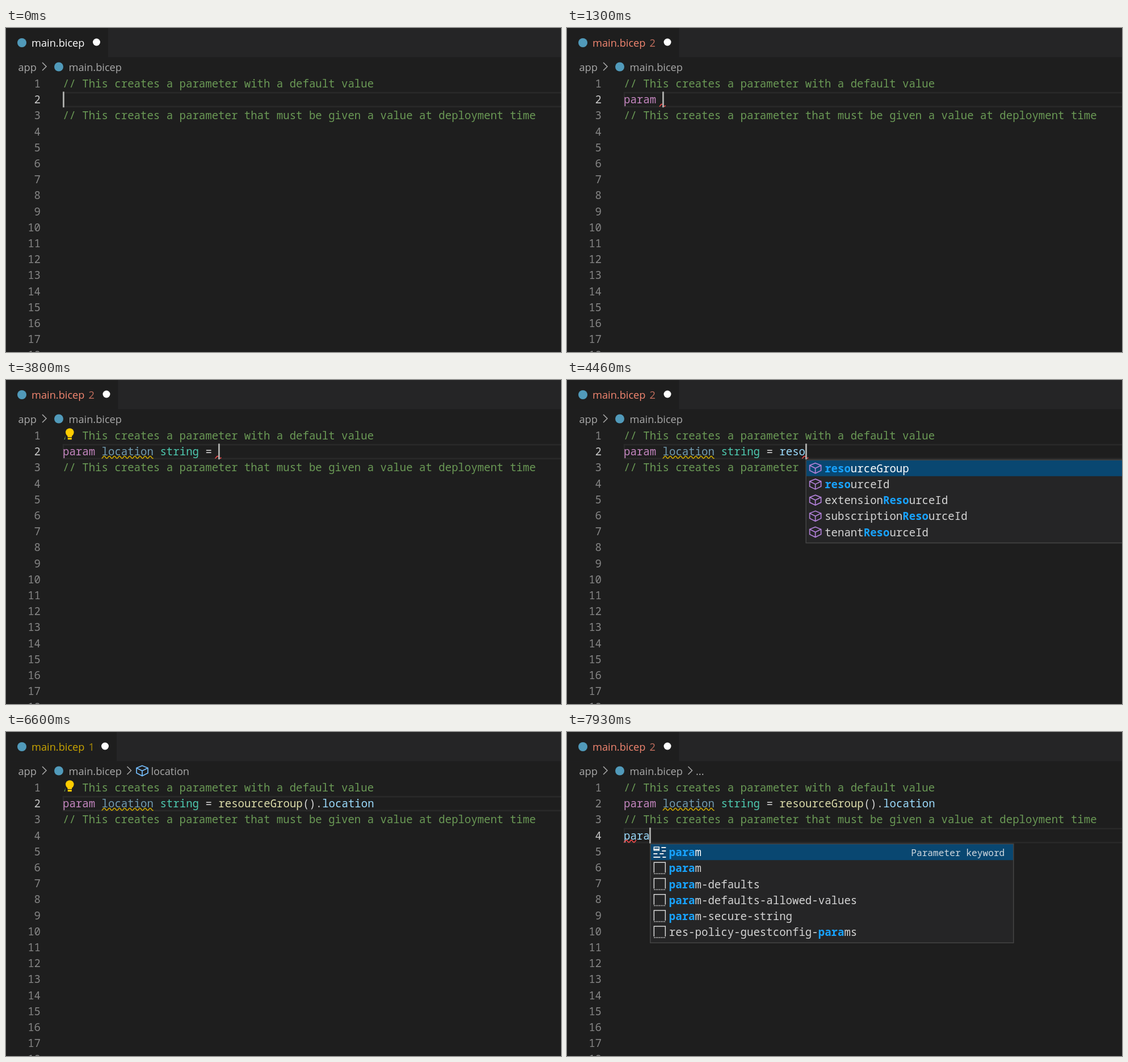
Animation of 978 by 572 pixels, one loop 8000 ms. Source, as an HTML page with a canvas:

```html
<!DOCTYPE html>
<html lang="en">
<head>
<meta charset="utf-8">
<title>Editor typing</title>
<style>
html, body { margin: 0; width: 100%; height: 100%; overflow: hidden; background: #1e1e1e; }
canvas { display: block; }
</style>
</head>
<body>
<canvas id="stage" width="978" height="572"></canvas>
<script>
const ctx = document.getElementById('stage').getContext('2d');
const LOOP = 8000, LEFT = 100, CHAR = 11.43, LINE = 28.2, TOP = 84.2;
const MONO = '19.05px "Noto Sans Mono", monospace';
const SMALL = '16.2px "Noto Sans Mono", monospace';
const UI = '18.2px "Open Sans", sans-serif';
const RED = '#f14c4c', YELLOW = '#cca700', BLUE = '#519aba';
const colX = col => LEFT + col * CHAR;
const lineTop = line => TOP + (line - 1) * LINE;

// Completion lists: [label, icon, detail]
const group = (icon, names, detail = '') => names.split(' ').map(name => [name, icon, detail]);
const MENUS = {
  words: [
    ['param', 'keyword', 'Parameter keyword'],
    ...group('snippet', 'param param-defaults param-defaults-allowed-values param-secure-string'),
    ...group('snippet', 'res-policy-guestconfig-params res-api-management res-app-plan'),
    ...group('snippet', 'res-policy-assignment res-postgres-database res-private-dns-zone'),
    ['output', 'keyword', 'Output keyword']
  ],
  types: [
    ...group('type', 'array bool int object'),
    ['secureObject', 'snippet', 'Secure object'],
    ['secureString', 'snippet', 'Secure string'],
    ['string', 'type', '']
  ],
  functions: group('cube', 'any base64 bool coalesce concat contains empty endsWith json last length max ' +
    'range reference replace resourceGroup resourceId extensionResourceId subscriptionResourceId tenantResourceId'),
  members: group('property', 'id location managedBy name properties tags type')
};

// Timeline: each step overrides part of the editor state
const steps = [[0, { line: 2, 2: '', 4: '', col: null, menu: '', tab: '', count: '', crumb: '', cursor: true }]];
const at = (time, change) => steps.push([time, change]);
const type = (line, base, text, ...times) =>
  times.forEach((time, i) => at(time, { [line]: base + text.slice(0, i + 1) }));
const problems = (time, tab, count, err) => at(time, { tab, count, err });

type(2, '', 'param ', 100, 430, 800, 930, 1060, 1200);
problems(330, '#f48771', 1, [0, 1]);
at(500, { menu: 'words' });
at(1200, { menu: '' });
problems(1260, '#f48771', 2, 'cursor');
type(2, 'param ', 'location ', 1330, 1400, 1500, 1600, 1630, 1700, 1730, 1760, 2030);
at(1900, { warn: true, bulb: true });
at(2030, { bulb: false });
at(2130, { menu: 'types' });
type(2, 'param location ', 'string = ', 2360, 2530, 2730, 2860, 2960, 3060, 3530, 3630, 3760);
at(3060, { menu: '' });
problems(3230, YELLOW, 1, null);
at(3430, { bulb: true });
problems(3700, '#f48771', 2, 'cursor');
at(3860, { menu: 'functions' });
const prefix = 'param location string = ', call = prefix + 'resourceGroup()';
type(2, prefix, 'resourc', 3960, 4130, 4360, 4430, 4500, 4600, 4700);
at(4360, { bulb: false });
at(4830, { 2: call, col: 38, menu: '', err: [24, 39], crumb: 'location' });
at(4900, { bulb: true });
at(5000, { hint: true });
at(5300, { col: null });
at(5400, { hint: false });
type(2, call, '.l', 5600, 6000);
at(5600, { err: 'cursor' });
at(5700, { menu: 'members' });
type(2, call, '.loc', 6000, 6000, 6160, 6230);
steps.splice(-4, 2);
at(6300, { 2: call + '.location', menu: '' });
problems(6400, YELLOW, 1, null);
at(6600, { cursor: false });
at(6860, { cursor: true });
at(7000, { line: 3, col: 48 });
at(7100, { col: 73 });
at(7200, { line: 4, col: null, bulb: false });
at(7300, { crumb: '...' });
type(4, '', 'para', 7530, 7660, 7760, 7860);
at(7600, { menu: 'words' });
problems(7860, '#f48771', 2, [0, 2]);
steps.sort((a, b) => a[0] - b[0]);

function text(str, x, y, color, font = MONO, align = 'left') {
  ctx.font = font;
  ctx.fillStyle = color;
  ctx.textAlign = align;
  ctx.fillText(str, x, y);
}
function rect(x, y, w, h, color) {
  ctx.fillStyle = color;
  ctx.fillRect(x, y, w, h);
}
function frame(x, y, w, h, color, width = 1.5) {
  ctx.strokeStyle = color;
  ctx.lineWidth = width;
  ctx.strokeRect(x, y, w, h);
}
function disc(x, y, r, color) {
  ctx.fillStyle = color;
  ctx.beginPath();
  ctx.arc(x, y, r, 0, 7);
  ctx.fill();
}
function path(d, x, y, color, width = 1.5) {
  ctx.save();
  ctx.translate(x, y);
  ctx.strokeStyle = color;
  ctx.lineWidth = width;
  ctx.stroke(new Path2D(d));
  ctx.restore();
}
function squiggle(line, x1, x2, color) {
  const y = lineTop(line) + 24;
  ctx.beginPath();
  for (let x = x1; x <= x2; x++) ctx.lineTo(x, y - 2 * Math.cos((x - x1) * Math.PI * 2 / 9 + Math.PI));
  ctx.strokeStyle = color;
  ctx.lineWidth = 1.6;
  ctx.stroke();
}

const icons = {
  snippet(x, y) {
    path('M-10 8V-10H10V8', x, y, '#d8d8d8');
    for (let i = -10; i <= 9; i += 3) rect(x + i, y + 9, 1.6, 1.6, '#d8d8d8');
  },
  keyword(x, y) {
    path('M-11 -5H-1M3 -8H11M4 -2H11M-11 3H-4M0 3H7M-11 9H1M5 9H11', x, y, '#eee', 2);
    frame(x - 10, y - 9, 9, 6, '#eee');
  },
  type: (x, y) => path('M-10 -3L-4 -9L0 -5L-6 1ZM-2 -3H4M0 -3V6H4M4 -3L7 -6L10 -3L7 0ZM4 6L7 3L10 6L7 9Z', x, y, '#ee9d28', 1.8),
  cube: (x, y, color = '#b180d7') => path('M0 -9L10 -5V4L0 9L-10 4V-5ZM-10 -5L0 0L10 -5M0 0V9', x, y, color, 1.7),
  property: (x, y) => path('M-9 7L1 -3A6 6 0 0 1 8 -9L4 -5L6 -2L10 -5A6 6 0 0 1 3 2L-6 10Z', x, y, '#d4d4d4')
};

// Indices of the label's letters that match the query, or null
function match(label, query) {
  const low = label.toLowerCase(), start = low.indexOf(query);
  if (start >= 0) return [...query].map((_, i) => start + i);
  let from = -1;
  const found = [...query].map(ch => from < 0 && from !== -1 ? -2 : (from = low.indexOf(ch, from + 1)) < 0 ? (from = -2) : from);
  return found.includes(-2) ? null : found;
}

function drawMenu(items, query, x, y) {
  const rows = items.map(item => ({ item, hits: match(item[0], query) })).filter(row => row.hits)
    .sort((a, b) => b.item[0].startsWith(query) - a.item[0].startsWith(query)).slice(0, 12);
  const height = rows.length * LINE + 5.5;
  rect(x, y, 641, height, '#252526');
  rows.forEach(({ item: [label, icon, detail], hits }, i) => {
    const mid = y + 15.1 + i * LINE;
    if (!i) rect(x + 1, y + 1, 639, LINE, '#094771');
    icons[icon](x + 17, mid);
    [...label].forEach((ch, k) => {
      const hit = hits.includes(k);
      text(ch, x + 33.5 + k * CHAR, mid + 7, hit ? '#18a3ff' : i ? '#d4d4d4' : '#fff', (hit ? 'bold ' : '') + MONO);
    });
    if (!i) text(detail, x + 625, mid + 6.5, '#d0d8df', SMALL, 'right');
  });
  frame(x + .5, y + .5, 640, height, '#454545');
}

function drawCode(line, code, warn) {
  const baseline = lineTop(line) + 20.8;
  if (code.startsWith('//')) return text(code, LEFT, baseline, '#6a9955');
  for (const { 0: word, index } of code.matchAll(/\w+|[^\w\s]/g)) {
    const color = word === 'param' ? '#c586c0'
      : word === 'string' ? '#4ec9b0'
      : word === 'resourceGroup' ? '#dcdcaa'
      : /\W/.test(word) ? '#d4d4d4'
      : warn && index === 6 ? '#729db3' : '#9cdcfe';
    text(word, colX(index), baseline, color);
  }
}

function drawHeader(s) {
  const shift = s.count === 2 ? 17.5 : s.count ? 15 : 0;
  rect(0, 0, 978, 51.5, '#252526');
  rect(0, 0, 180 + shift, 51.5, '#1e1e1e');
  disc(28, 26, 8, BLUE);
  text('main.bicep', 45, 32.5, s.tab || '#fff', UI);
  ctx.globalAlpha = .78;
  text(s.count, 145.5, 32.5, s.tab, UI);
  ctx.globalAlpha = 1;
  disc(159.5 + shift, 25, 6.5, '#fff');

  const grey = '#a9a9a9', chevron = 'M0 -7L7 0L0 7';
  text('app', 21.5, 75.5, grey, UI);
  path(chevron, 64, 68, grey);
  disc(93, 68.5, 8, BLUE);
  text('main.bicep', 110.5, 75.5, grey, UI);
  if (!s.crumb) return;
  path(chevron, 213.5, 68, grey);
  if (s.crumb === '...') return text('...', 227, 75.5, grey, UI);
  icons.cube(240, 68.5, '#75beff');
  text(s.crumb, 255.5, 75.5, grey, UI);
}

function drawBulb() {
  rect(104.5, 84, 21, 26, '#1e1e1e');
  disc(112.3, 92.5, 7.3, '#fc0');
  rect(108.5, 96, 7.6, 5, '#fc0');
  rect(108.8, 102, 7, 3.2, '#fc0');
}

function drawHint() {
  rect(534, 17, 460, 95, '#252526');
  frame(534.5, 17.5, 460, 94, '#454545');
  text('resourceGroup(): resourceGroup', 542, 42, '#d4d4d4');
  rect(535, 52, 443, 1.5, '#454545');
  text('Returns the current resource group scope.', 542, 75, '#ccc', UI);
  text('Used in resource group deployments.', 542, 101, '#ccc', UI);
}

function draw(time) {
  const s = {};
  for (const [start, change] of steps) if (start <= time) Object.assign(s, change);
  const lines = {
    1: '// This creates a parameter with a default value',
    2: s[2],
    3: '// This creates a parameter that must be given a value at deployment time',
    4: s[4]
  };
  const code = lines[s.line], col = s.col ?? code.length, x = colX(col), y = lineTop(s.line);

  rect(0, 0, 978, 572, '#1e1e1e');
  frame(LEFT + 1, y + 1.8, 900, LINE - 3.6, '#292929', 2.6);
  for (let n = 1; n <= 18; n++)
    text(n, 61, lineTop(n) + 20.8, n === s.line ? '#c6c6c6' : '#858585', MONO, 'right');
  drawHeader(s);
  for (const n in lines) drawCode(+n, lines[n], s.warn);

  if (s.warn) squiggle(2, colX(6), colX(14), YELLOW);
  if (s.err === 'cursor') squiggle(s.line, x - 6, x + 5, RED);
  else if (s.err) squiggle(s.line, colX(s.err[0]), colX(s.err[1]), RED);
  if (s.line === 2 && code.endsWith('()')) frame(colX(37) + 1, y + 1, 2 * CHAR, LINE - 2, '#888');
  if (s.bulb) drawBulb();
  if (s.cursor) rect(Math.round(x - .3), y, 2.8, LINE - .4, '#aeafad');
  if (s.menu) drawMenu(MENUS[s.menu], code.match(/\w*$/)[0], x + .6, y + LINE);
  if (s.hint) drawHint();
}

const begin = performance.now();
function tick() {
  draw((performance.now() - begin) % LOOP);
  requestAnimationFrame(tick);
}
tick();
</script>
</body>
</html>
```
